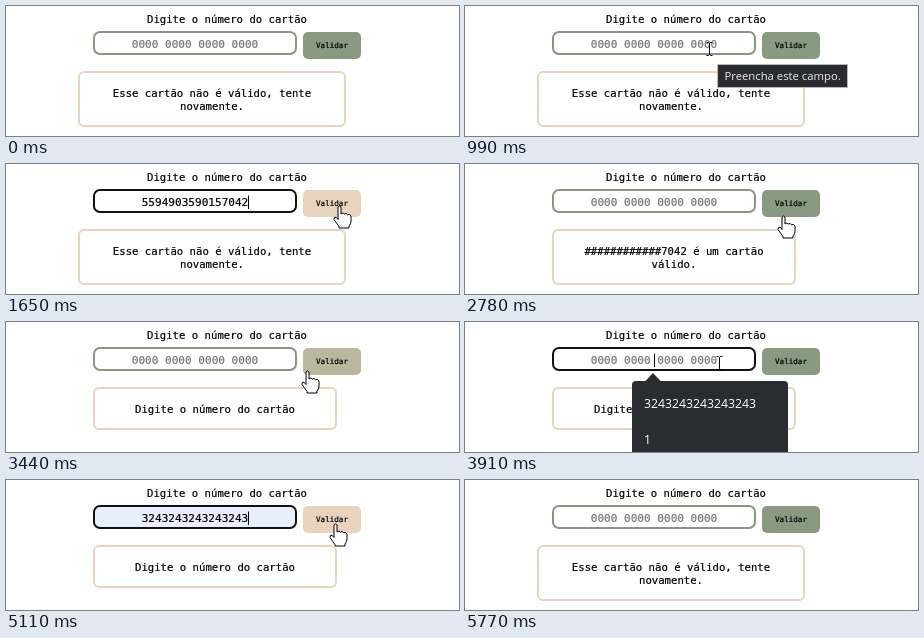
Animation of 453x130 px, one loop 6640 ms. Source, as an HTML page:

```html
<!DOCTYPE html>
<html lang="pt-BR">
<head>
<meta charset="utf-8">
<title>Validador de cartão</title>
<style>
  html, body { margin: 0; width: 100%; height: 100%; overflow: hidden; background: #fff; }
  svg { display: block; width: 453px; height: 130px; }
  text { white-space: pre; }
  .mono { font: 10.63px "DejaVu Sans Mono", monospace; text-anchor: middle; fill: #000; stroke: #000; stroke-width: .2; }
  .field { font-size: 11.07px; }
  .hint { fill: #757575; stroke: #757575; }
  .label { font-size: 7.6px; }
  .ui { font: 12.25px "Open Sans", sans-serif; fill: #fff; }
  .tip { font-size: 11.3px; fill: #eee; }
</style>
</head>
<body>
<svg viewBox="0 0 453 130">
  <text class="mono" x="221" y="17">Digite o número do cartão</text>
  <rect id="input" x="88" y="26" width="202" height="22" rx="6" stroke-width="2"/>
  <text id="value" x="189" y="42"></text>
  <path id="caret" d="M0 31.5V45" stroke="#000"/>
  <rect id="button" x="297" y="26" width="58" height="27" rx="5"/>
  <text class="mono label" x="326" y="42">Validar</text>

  <rect id="box" y="66" rx="5" fill="none" stroke="#ebd4bb" stroke-width="2"/>
  <text id="line1" class="mono" y="91"></text>
  <text id="line2" class="mono" y="104"></text>

  <g id="popup">
    <path d="M180 59.5L188 51L196 59.5Z" fill="#2b2c30"/>
    <rect x="167" y="59" width="156" height="83" rx="4" fill="#2b2c30"/>
    <rect id="row" x="167" y="65" width="156" height="35" fill="#414247"/>
    <text class="ui" x="179" y="86">3243243243243243</text>
    <text class="ui" x="179" y="122">1</text>
  </g>

  <g id="tooltip">
    <rect x="252.5" y="58.5" width="130" height="23" fill="#2b2c30" stroke="#bbb"/>
    <text class="ui tip" x="259.5" y="74">Preencha este campo.</text>
  </g>

  <g id="cursor">
    <path id="arrow" d="M.5.5V16L4.2 12.6L6.8 18.5L9.4 17.3L6.8 11.6H11.8Z" fill="#fff" stroke="#000"/>
    <path id="beam" d="M-2.5-6.5H-.5L.5-5.5L1.5-6.5H3.5M.5-5.5V5.5M-2.5 6.5H-.5L.5 5.5L1.5 6.5H3.5" fill="none" stroke="#000"/>
    <path id="hand" d="M-2 2Q-.5 0 1 2V9Q3 7 4.5 9Q6 7.6 7.5 9.7Q10 8.5 11 11V16Q11 19 9 21V23H-1V21.5L-6 14.5Q-6.5 12-4 12.2L-2 14.5Z"
      fill="#fff" stroke="#000" stroke-linejoin="round"/>
  </g>
</svg>
<script>
const LOOP = 6640, TICKS = 100, TRAVEL = 6;
const $ = id => document.getElementById(id);
const set = (id, attrs) => {
  for (const name in attrs) $(id).setAttribute(name, attrs[name]);
};
const show = (id, on) => set(id, { display: on ? "inline" : "none" });
const within = (v, from, to) => v >= from && v < to;
const clamp = v => Math.max(0, Math.min(1, v));
const smooth = p => p * p * (3 - 2 * p);
const lerp = (a, b, p) => a + (b - a) * p;

// Rises after `on`, falls after `off`.
const pulse = (t, on, off, rise, fall) => clamp((t - on) / rise) * clamp(1 - (t - off) / fall);

// User actions, in ticks.
const FOCUS = 17, PASTE = 20, SUBMIT = 29, SUBMIT_EMPTY = 49,
      REFOCUS = 57, PICK = 67, RESUBMIT = 78;

const stops = [
  { at: 1, x: 298, y: 95 },
  { at: 7, x: 244, y: 43 },
  { at: 25, x: 334, y: 41 },
  { at: 37, x: 385, y: 74 },
  { at: 42, x: 319, y: 51 },
  { at: 56, x: 254, y: 41 },
  { at: 66, x: 254, y: 80 },
  { at: 76, x: 330, y: 43 },
  { at: 87, x: 444, y: 118 }
];

const messages = {
  invalid: { x: 73, w: 266, h: 54, lines: ["Esse cartão não é válido, tente", "novamente."] },
  valid: { x: 88, w: 242, h: 54, lines: ["############7042 é um cartão", "válido."] },
  empty: { x: 88, w: 242, h: 41, lines: ["Digite o número do cartão", ""] }
};

function drawField(t) {
  const focused = within(t, FOCUS, SUBMIT) || within(t, REFOCUS, RESUBMIT);
  const autofilled = within(t, PICK - 3, RESUBMIT);
  const value = within(t, PASTE, SUBMIT) ? "5594903590157042" : autofilled ? "3243243243243243" : "";
  set("input", { stroke: focused ? "#111" : "#87987f", fill: autofilled ? "#e8f0fe" : "#fff" });
  set("value", { class: value ? "mono field" : "mono field hint" });
  $("value").textContent = value || "0000 0000 0000 0000";
  show("caret", focused);
  set("caret", { transform: `translate(${value ? 242.5 : 189.5} 0)` });
}

function drawMessage(t) {
  const state = within(t, SUBMIT, SUBMIT_EMPTY) ? "valid"
    : within(t, SUBMIT_EMPTY, RESUBMIT) ? "empty" : "invalid";
  const { x, w, h, lines } = messages[state];
  set("box", { x, width: w, height: h });
  lines.forEach((line, i) => {
    const id = "line" + (i + 1);
    set(id, { x: x + w / 2 });
    $(id).textContent = line;
  });
}

function drawButton(t) {
  const hover = pulse(t, 22, SUBMIT + 1, 3, 4) + pulse(t, 42, SUBMIT_EMPTY + 1, 3, 4)
    + pulse(t, 74, RESUBMIT + 2, 3, 4);
  const mix = (a, b) => Math.round(lerp(a, b, hover));
  set("button", { fill: `rgb(${mix(138, 233)},${mix(154, 211)},${mix(128, 188)})` });
}

function drawPopups(t) {
  const fade = pulse(t, FOCUS, PASTE, 2, 2.5) + pulse(t, REFOCUS, PICK, 2, 2.5);
  set("popup", {
    opacity: fade,
    transform: `translate(245 95) scale(${lerp(.945, 1, fade)}) translate(-245 -95)`
  });
  show("row", within(t, PICK - 4, PICK + 1));
  show("tooltip", within(t, 15, FOCUS));
}

function drawCursor(t) {
  const next = stops.findIndex(stop => stop.at > t);
  show("cursor", next > 0 && t > stops[0].at);
  if (next < 1) return;
  const a = stops[next - 1], b = stops[next];
  const begin = Math.max(a.at, b.at - TRAVEL);
  const p = smooth(clamp((t - begin) / (b.at - begin)));
  const x = Math.round(lerp(a.x, b.x, p)), y = Math.round(lerp(a.y, b.y, p));
  const overField = within(x, 87, 291) && within(y, 25, 50);
  const overButton = within(x, 297, 355) && within(y, 26, 53);
  set("cursor", { transform: `translate(${x} ${y})` });
  show("beam", overField);
  show("hand", overButton);
  show("arrow", !overField && !overButton);
}

function render(ms) {
  const t = Math.floor((ms % LOOP) / LOOP * TICKS + .25);
  drawField(t);
  drawMessage(t);
  drawButton(t);
  drawPopups(t);
  drawCursor(t);
}

const start = performance.now();
function loop() {
  render(performance.now() - start);
  requestAnimationFrame(loop);
}
loop();
</script>
</body>
</html>
```
